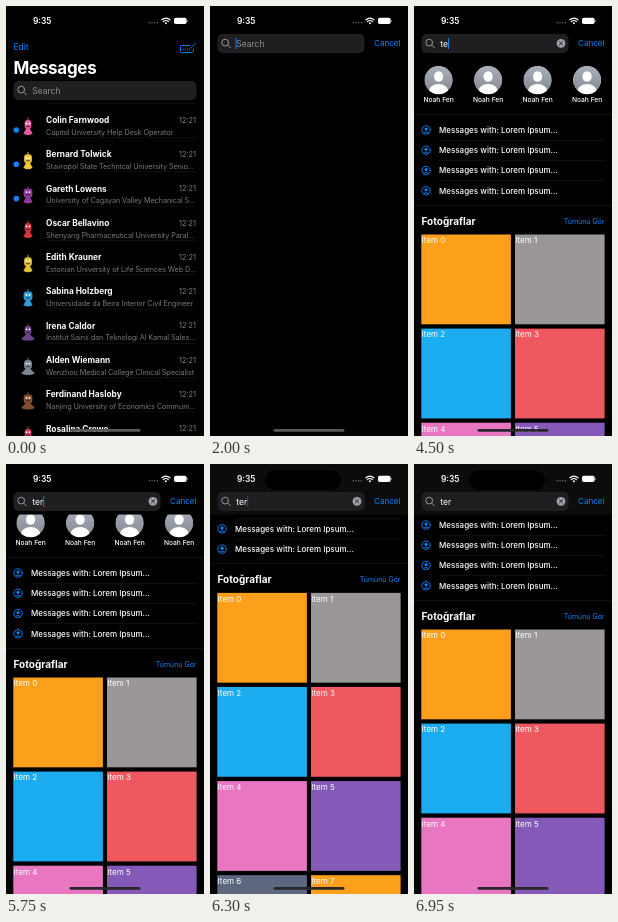
An HTML page for the animation above (7000 ms loop, 198 px wide and 430 px high).

```html
<!DOCTYPE html>
<html lang="en">
<head>
<meta charset="utf-8">
<title>Message search</title>
<style>
  html, body { margin: 0; height: 100%; background: #000; overflow: hidden; }
  svg { display: block; width: 100vw; height: 100vh; font-family: Inter, Roboto, sans-serif; }
  text { white-space: pre; }
  .line { fill: none; stroke-linecap: round; stroke-linejoin: round; }
</style>
</head>
<body>
<svg viewBox="0 0 198 430">
  <defs>
    <linearGradient id="grey" x2="0" y2="1">
      <stop stop-color="#a9afbc"/><stop offset="1" stop-color="#838791"/>
    </linearGradient>
    <clipPath id="disc"><circle r="14.3"/></clipPath>
  </defs>
  <rect width="198" height="430"/>
  <g id="inbox"></g>
  <g id="results"></g>
  <g id="header">
    <rect width="198" height="50.5"/>
    <g id="tint">
      <rect width="198" height="50.5" fill="#0c0c0d"/>
      <rect x="55" y="6.5" width="76" height="19.5" rx="9.7"/>
    </g>
  </g>
  <g id="nav"></g>
  <g id="title"></g>
  <g id="search">
    <rect id="field" x="7.5" y="28" height="19" rx="5" fill="#1f1f22"/>
    <path class="line" d="M18 39.4L20.3 41.7M18.6 36.6a3.4 3.4 0 1 1-6.8 0a3.4 3.4 0 1 1 6.8 0" stroke="#98989f"/>
    <g id="query"></g>
    <rect id="caret" y="32" width="1" height="11" rx=".5" fill="#0a84ff"/>
    <g id="clear">
      <circle cx="147" cy="37.3" r="4.4" fill="#a0a0a6"/>
      <path class="line" d="M145.4 35.7l3.2 3.2m0-3.2l-3.2 3.2" stroke="#1f1f22" stroke-width=".9"/>
    </g>
  </g>
  <g id="cancel"></g>
  <g id="popup">
    <path d="M22.5 50.5L26 46.8L29.5 50.5z" fill="#262629"/>
    <rect x="18.5" y="50" width="23.2" height="19.3" rx="4" fill="#262629"/>
    <path class="line" d="M26.5 57.3v-1.8h1.8M31.7 55.5h1.8v1.8M33.5 60.700v1.800h-1.800M28.300 62.500h-1.800v-1.800M28.400 57.800h3.200M28.400 59.100h3.200M28.400 60.400h2" stroke="#e8e8e8" stroke-width=".8"/>
  </g>
  <g id="status"></g>
  <rect id="home" x="63.5" y="423" width="71" height="2.8" rx="1.4"/>
</svg>
<script>
const BLUE = '#0a84ff', GREY = '#85858a', RULE = '#1d1d1f', LOOP = 7000;
const $ = id => document.getElementById(id);

// Text is placed by the vertical middle of its capitals.
const text = (x, mid, size, str, fill = '#fff', weight = 400, extra = '') =>
  `<text x="${x}" y="${mid + size * .36}" font-size="${size}" fill="${fill}" font-weight="${weight}" ${extra}>${str}</text>`;
const rect = (x, y, w, h, fill, rx = 0) =>
  `<rect x="${x}" y="${y}" width="${w}" height="${h}" rx="${rx}" fill="${fill}"/>`;
const circle = (x, y, r, fill) => `<circle cx="${x}" cy="${y}" r="${r}" fill="${fill}"/>`;
const line = (d, stroke, width = 1) =>
  `<path class="line" d="${d}" stroke="${stroke}" stroke-width="${width}"/>`;

const people = [
  ['Colin Farnwood', 'Capitol University Help Desk Operator', '#e8589f'],
  ['Bernard Tolwick', 'Stavropol State Technical University Senio...', '#f0c93a'],
  ['Gareth Lowens', 'University of Cagayan Valley Mechanical S...', '#8d3a9c'],
  ['Oscar Bellavino', 'Shenyang Pharmaceutical University Paral...', '#d8323c'],
  ['Edith Krauner', 'Estonian University of Life Sciences Web D...', '#e0c035'],
  ['Sabina Holzberg', 'Universidade da Beira Interior Civil Engineer', '#2f9bd8'],
  ['Irena Caldor', 'Institut Sains dan Teknologi Al Kamal Sales...', '#6b4387'],
  ['Alden Wiemann', 'Wenzhou Medical College Clinical Specialist', '#7d8492'],
  ['Ferdinand Hasloby', 'Nanjing University of Economics Communi...', '#80502f'],
  ['Rosalina Crewe', 'Kyoto University Sales Director', '#c03a58'],
];

function robot(y, color, i) {
  const wide = 3.4 + i % 3 * .5, foot = i > 5 ? 7 : 4.6;
  return line(`M22 ${y}v-3`, color, .9) +
    rect(22 - wide, y - 1, wide * 2, 9, color, 3.2) +
    `<path d="M20.500 ${y + 7}h3l${foot - 1.5} 5.500q-${foot} 3-${foot * 2} 0z" fill="${color}"/>` +
    circle(20.5, y + 2.5, .9, '#fff') + circle(23.5, y + 2.5, .9, '#fff') +
    line(`M20.500 ${y + 5.500}h3`, '#2a1420', .8);
}

$('inbox').innerHTML = people.map(([name, role, color], i) => {
  const y = 97 + i * 34.3;
  return rect(40, y, 150, .5, RULE) +
    (i < 3 ? circle(10.3, y + 27, 2.8, BLUE) : '') +
    robot(y + 18, color, i) +
    text(40, y + 17, 8.3, name, '#fff', 700) +
    text(40, y + 29, 7.3, role, '#77777c', 400, 'letter-spacing="-.1"') +
    text(190, y + 17, 7.3, '12:21', GREY, 400, 'text-anchor="end"');
}).join('');

$('nav').innerHTML = text(7.5, 41, 8.5, 'Edit', BLUE) +
  line('M184 39.500h-8.500q-1 0-1 1v5q0 1 1 1h11q1 0 1-1v-2.500M183 43.500l6.500-6', BLUE, .9) +
  [177, 179.3, 181.6].map(x => circle(x, 43.2, .6, BLUE)).join('');
$('title').innerHTML = text(7.5, 62, 17, 'Messages', '#fff', 700, 'letter-spacing="-.3"');
$('cancel').innerHTML = text(164, 37.5, 8.1, 'Cancel', BLUE);
$('query').innerHTML = text(26.3, 37.5, 8.5, '');
$('status').innerHTML = text(27, 15, 8.4, '9:35', '#fff', 600) +
  [143.3, 146, 148.7, 151.4].map(x => circle(x, 16.7, .7, '#77777a')).join('') +
  line('M155.900 13.800q4-3.400 8 0M157.500 15.500q2.400-2 4.800 0', '#fff', 1.2) +
  circle(159.9, 17.2, 1, '#fff') +
  rect(168, 11.7, 12.6, 6.3, '#fff', 1.8) + rect(181.200, 13.800, .8, 2.2, '#999', .4);

// Result list, laid out as it stands before scrolling.
const tiles = ['#fc9f1a', '#9b9799', '#1badef', '#f05860', '#e976c1', '#8459b7', '#5d6880'];
const contact = (_, i) => {
  const x = 24.6 + i * 49.5;
  return `<g transform="translate(${x} 74)" clip-path="url(#disc)">
    <circle r="14.3" fill="url(#grey)"/><ellipse cy="-3.500" rx="4.600" ry="5.300" fill="#fff"/>
    <ellipse cy="10.500" rx="9.500" ry="6.500" fill="#fff"/></g>` +
    text(x, 94, 6.7, 'Noah Fen', '#fff', 500, 'text-anchor="middle"');
};
const suggestion = (_, i) => {
  const y = 124 + i * 20.25;
  return line(`M16.300 ${y}a4.200 4.200 0 1 1-8.400 0a4.200 4.200 0 1 1 8.400 0M9.500 ${y + 3}q2.600-2.600 5.200 0`, BLUE, .9) +
    circle(12.1, y - 1, 1.6, BLUE) +
    text(25, y, 8, 'Messages with: Lorem Ipsum...', '#fff', 500) +
    (i < 3 ? rect(25, y + 10, 166, .5, RULE) : '');
};
const tile = (_, i) => {
  const x = i % 2 ? 101 : 7.3, y = 228.5 + (i >> 1) * 94.1;
  return rect(x, y, 89.6, 89.8, tiles[i % 7]) + text(x + .3, y + 6, 8, 'Item ' + i);
};
const repeat = (length, draw) => Array.from({ length }, draw).join('');
$('results').innerHTML = repeat(4, contact) + rect(0, 108.5, 198, .5, RULE) +
  repeat(4, suggestion) + rect(0, 199, 198, .5, RULE) +
  text(7.5, 215, 10, 'Fotoğraflar', '#fff', 700) +
  text(190.5, 215, 7, 'Tümünü Gör', BLUE, 400, 'text-anchor="end"') + repeat(8, tile);

const clamp = v => Math.min(1, Math.max(0, v));
const ramp = (t, from, to) => clamp((t - from) / (to - from));
const smooth = p => p * p * (3 - 2 * p);

const scrollKeys = [[5500, 0], [5750, 15], [6050, 58], [6500, 130.5], [6600, 131.5], [6950, 63]];
function scrollAt(t) {
  const last = scrollKeys.length - 1;
  if (t <= scrollKeys[0][0]) return 0;
  const i = scrollKeys.findIndex(k => k[0] >= t) - 1;
  if (i < 0) return scrollKeys[last][1];
  const slope = n => {
    const a = scrollKeys[Math.max(n - 1, 0)], b = scrollKeys[Math.min(n + 1, last)];
    return (b[1] - a[1]) / (b[0] - a[0]);
  };
  const [t0, y0] = scrollKeys[i], [t1, y1] = scrollKeys[i + 1];
  const h = t1 - t0, u = (t - t0) / h, v = 1 - u;
  return v * v * ((1 + 2 * u) * y0 + u * h * slope(i)) +
         u * u * ((1 + 2 * v) * y1 - v * h * slope(i + 1));
}

function caretAt(t) {
  if (t < 1600) return 0;
  if (t < 2400) return 1 - ramp(t, 2100, 2350);
  if (t < 3600) return ramp(t, 2400, 2650) * (1 - ramp(t, 2750, 2850));
  if (t < 4850) return 1;
  const phase = (t - 4350) % 1000;
  return phase < 700 ? 1 - ramp(phase, 500, 600) : ramp(phase, 900, 1000);
}

const fade = (id, value) => $(id).setAttribute('opacity', clamp(value));
const move = (id, x, y) => $(id).setAttribute('transform', `translate(${x} ${y})`);
const query = $('query').firstElementChild;

function draw(now) {
  const t = Math.floor(now % LOOP / 50) * 50;
  const open = t < 1600 ? 0 : smooth(ramp(t, 1530, 2000));
  const lift = 47 * open;
  const typed = 'ter'.slice(0, (t >= 3700) + (t >= 4300) + (t >= 4700));
  const shown = ramp(t, 3700, 3950);
  const scroll = scrollAt(t);

  move('inbox', 0, -lift);
  move('title', 0, -lift);
  fade('inbox', 1 - open * 2);
  fade('title', 1 - open * 3.5);
  fade('nav', 1 - open * 3.5);

  move('search', 0, 47 - lift);
  $('field').setAttribute('width', 183 - 36 * open);
  move('cancel', 36 * (1 - open), 0);
  fade('cancel', open);
  fade('popup', ramp(t, 3150, 3300) * (1 - ramp(t, 3500, 3700)));

  query.textContent = typed || 'Search';
  query.setAttribute('fill', typed ? '#fff' : '#8e8e93');
  $('caret').setAttribute('x', typed ? 26.3 + query.getComputedTextLength() : 25.5);
  fade('caret', caretAt(t));
  fade('clear', typed ? 1 : 0);

  fade('header', shown > 0 ? 1 : 0);
  fade('tint', (scroll - 20) / 30);
  fade('results', shown);
  move('results', 0, -scroll);
  $('home').setAttribute('fill', shown > .5 ? '#29272b' : '#58585b');
}

const start = performance.now();
function loop() {
  draw(performance.now() - start);
  requestAnimationFrame(loop);
}
loop();
</script>
</body>
</html>
```
